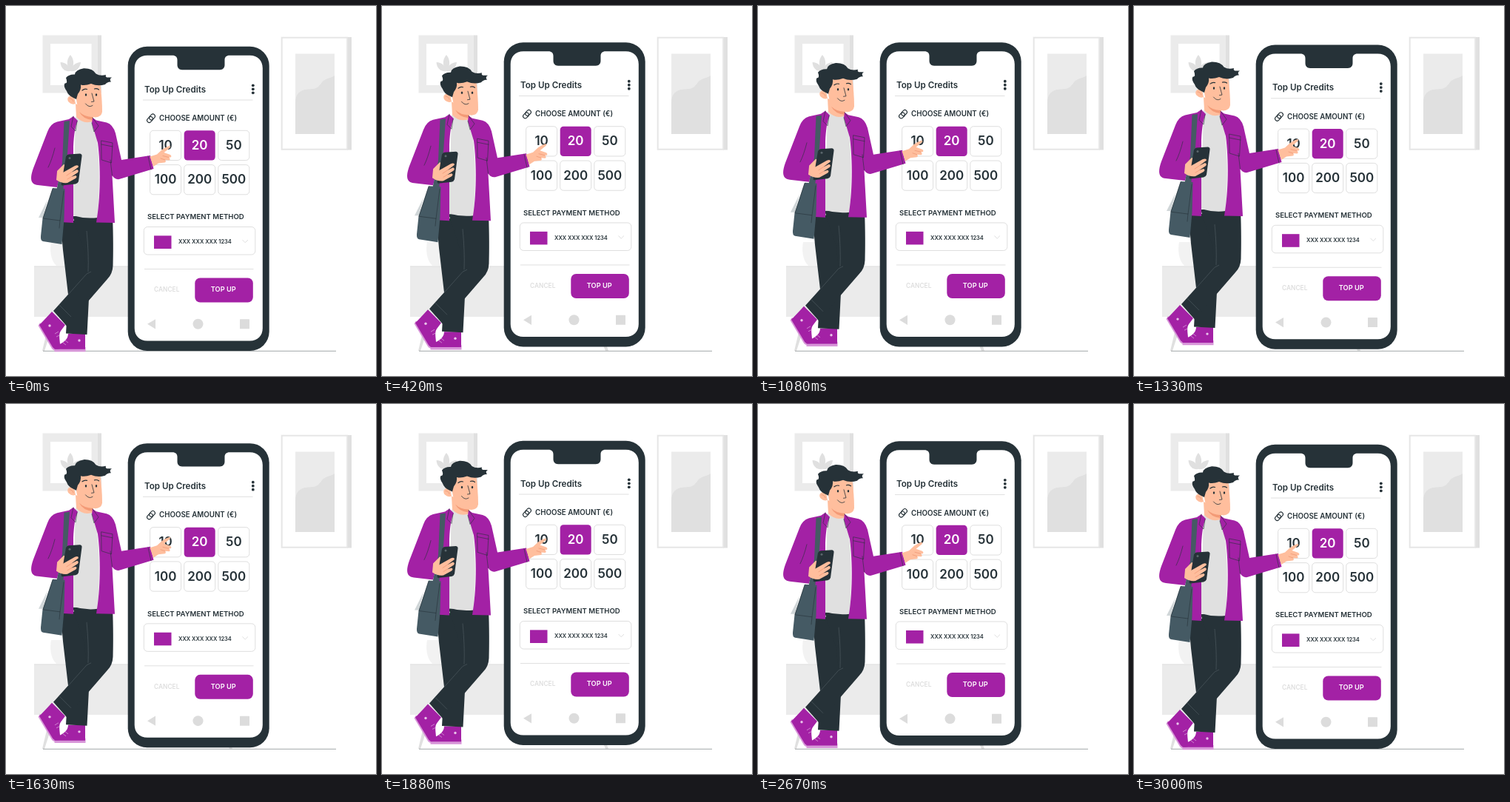
Recreate the animation shown at these times as an HTML page. Size 500 by 500 pixels, loop 3040 ms.

```html
<!DOCTYPE html>
<html lang="en">
<head>
<meta charset="utf-8">
<title>Top up credits</title>
<style>
  html, body { margin: 0; width: 100%; height: 100%; overflow: hidden; background: #fff; }
  svg { display: block; width: 100vw; height: 100vh; }
  text { font-family: Inter, Roboto, sans-serif; font-weight: 600; fill: #263238; }
  .dark { fill: #263238; }
  .purple { fill: #a321a5; }
  .skin { fill: #ffbe9d; }
  .bag { fill: #455a64; }
  .g1 { fill: #ebebeb; }
  .g2 { fill: #e0e0e0; }
  .line { fill: none; stroke: #263238; stroke-width: .6; stroke-linecap: round; stroke-linejoin: round; }
  .crease { stroke: #e98c68; }
  .rule { fill: none; stroke: #e0e0e0; stroke-width: 1; }
  .box { fill: #fff; stroke: #dedede; stroke-width: 1; }
  .num { font-size: 17px; text-anchor: middle; }
</style>
</head>
<body>
<svg viewBox="0 0 500 500">
  <!-- room -->
  <g>
    <rect class="g1" x="49.5" y="39.5" width="75" height="78"/>
    <rect class="g2" x="124" y="39.5" width="5" height="78"/>
    <rect x="60" y="51" width="55.5" height="56" fill="#fff"/>
    <g class="g2">
      <path d="M87 66C93 73 92 82 87 88C82 82 81 73 87 66Z"/>
      <path d="M73.5 76C81 76 86 81 87 88C79 89 74 84 73.5 76Z"/>
      <path d="M101 76C94 76 88 81 87 88C95 89 100 84 101 76Z"/>
    </g>
    <rect class="g2" x="461" y="42" width="6" height="152.5"/>
    <rect x="372.7" y="42.7" width="88.5" height="151" fill="#fff" stroke="#e6e6e6" stroke-width="2"/>
    <rect class="g1" x="391" y="64.5" width="53" height="108.5"/>
    <path class="g2" d="M391 173V131C391 119 397 113 408 112.5C420 112 421 111 427 103C432 97 439 98 444 94V173Z"/>
    <path d="M61 319H80V351H68C60 343 59 330 61 319Z" fill="#f2f2f2"/>
    <rect class="g1" x="38" y="351.5" width="275" height="68.5"/>
    <path class="rule" d="M38 352H313"/>
    <path class="g2" d="M60 420H67L52 466H49ZM283 420H290L306 466H302Z"/>
    <path d="M50 466.3H446" stroke="#8b9194" stroke-width=".8"/>
  </g>

  <!-- big phone -->
  <g id="phone">
    <rect class="dark" x="164.7" y="54.8" width="191" height="411.2" rx="26"/>
    <path fill="#fff" d="M191 66.8H225C229 66.8 231.5 69 231.5 73V79.5C231.5 83.5 234 86.2 238 86.2H289C293 86.2 295.500 83.5 295.500 79.5V73C295.500 69 298 66.8 302 66.8H329.5C340 66.8 346.8 74 346.8 84V435.500C346.8 445.500 340 452.500 329.5 452.500H191C180.500 452.500 173.700 445.500 173.700 435.500V84C173.700 74 180.500 66.8 191 66.8Z"/>
    <text x="187" y="116.600" font-size="11.600">Top Up Credits</text>
    <g class="dark">
      <circle cx="333.800" cy="107.300" r="1.900"/>
      <circle cx="333.800" cy="112.300" r="1.900"/>
      <circle cx="333.800" cy="117.300" r="1.900"/>
    </g>
    <path class="rule" d="M185 127H333.500M187 355.500H334.500"/>
    <g fill="none" stroke="#263238" stroke-width="1.100">
      <rect x="-4.300" y="-2.900" width="8.600" height="5.800" rx="2.900" transform="translate(197.500 150) rotate(-45)"/>
      <rect x="-4.300" y="-2.900" width="8.600" height="5.800" rx="2.900" transform="translate(194.500 153.500) rotate(-45)"/>
    </g>
    <text x="207" y="155" font-size="9.750">CHOOSE AMOUNT (€)</text>
    <g id="amounts"></g>
    <text x="191" y="288.200" font-size="9.600">SELECT PAYMENT METHOD</text>
    <rect class="box" x="186.300" y="298.500" width="150.500" height="37.500" rx="5"/>
    <rect class="purple" x="200" y="310.400" width="23.500" height="17.600"/>
    <text x="233" y="321.200" font-size="7.500">XXX XXX XXX 1234</text>
    <path class="rule" d="M319.500 316L323.200 319.800L327 316"/>
    <text x="217.200" y="386.300" font-size="8.400" text-anchor="middle" style="fill:#dedede">CANCEL</text>
    <rect class="purple" x="255.300" y="367.500" width="78.500" height="33" rx="7"/>
    <text x="293.700" y="386.300" font-size="9.200" text-anchor="middle" style="fill:#fff">TOP UP</text>
    <g fill="#dcdcdc">
      <path d="M191 429.800L202 423.200V436.500Z"/>
      <circle cx="259.500" cy="429.800" r="7"/>
      <rect x="316" y="423.300" width="13" height="13" rx=".5"/>
    </g>
  </g>

  <!-- man -->
  <g id="man">
    <!-- shoes -->
    <path fill="#d795d8" d="M46 428L43.500 432L62 463C64 466 70 467 73 464L71 460Z"/>
    <path class="purple" d="M62 413L80 431L74 439C70 444 74 455 73 463C70 465 65 464 63 461L45 431Q52 424 62 413Z"/>
    <path fill="#d795d8" d="M65.500 463.800V467.200H107.500V461Z"/>
    <path class="purple" d="M84 443H107V463.800H65.500C67 458 75 457 80 452Q84 448 84 443Z"/>
    <circle cx="59" cy="432" r="1.700" fill="#e9c4ea"/>
    <circle cx="99" cy="452" r="1.700" fill="#e9c4ea"/>
    <path d="M66 443L71 440M68 447L72 445M80 452L84 455M77 455L81 458" stroke="#e9c4ea" stroke-width=".6"/>

    <!-- trousers -->
    <path class="dark" d="M73 284L77 330L84 390L81 442.500L109.500 444L112 395L124 300Z"/>
    <path class="dark" d="M90 284H144C145 310 145 335 144.500 351Q144 362 137 369L82 432.500L64 412L109 362L105 330Z"/>
    <path d="M109 362L84 390M109 362L115 359M109 304Q112 335 111 359M72 404L88 420" fill="none" stroke="#5b676c" stroke-width=".5"/>

    <!-- tee and neck -->
    <path class="g2" d="M94 150L118 156C125 180 128 225 124 286Q107 288 90 283Z"/>
    <path class="skin" d="M94 132L95 150Q104 160 117 156L119 146Z"/>
    <path d="M99 143Q106 150 117 150L117 154Q104 153 99 143Z" fill="#f39a76"/>

    <!-- jacket -->
    <path class="purple" d="M91 149L85 153L69 156.500Q60 159 56 170L37 219C32 233 33 241 43 242L69 245L75 222L74 250L73 292L91 293V190Q92 165 97 155Z"/>
    <path class="purple" d="M117 151L122 154.500L136 157.500Q144.500 160 148 172L156 208L195 202L199.500 220L153 234Q147 235 143.500 229L147 293L122 292.500C128 260 128 215 124 185L116 158Z"/>
    <path class="line" d="M91 149L88 163L94 169L96 156M117 151L125 162L119 170L116 158M129 182L144 185L142.500 212L129.500 208ZM129 187L144 190M143.500 229L141 208M66 192Q62 208 57 218M192 203L196 221"/>

    <!-- bag -->
    <path class="bag" d="M78.500 156L86 155L83 200L77 250H68L76 212Z"/>
    <path class="bag" d="M56 262L44 286H50Z" opacity=".25"/>
    <path class="bag" d="M63 246L79.500 247L78.500 288L75.500 322L50 318Q46.500 317 47 311L49.500 287Z"/>
    <path class="line" d="M63 247L50 287L73 290L78 250M73 290L72 300"/>

    <!-- small phone and hand -->
    <path class="skin" d="M69 223L78 214L84 216L80 239L71 237Z"/>
    <path class="dark" d="M84.500 200.500L100 199.500Q103 200 102.500 203L98 237Q97 240 94 240.500L76 242.500Q74 242 75 239L81 203.500Q82 201 84.500 200.500Z"/>
    <circle cx="86" cy="205.500" r="1.500" fill="#5b676c"/>
    <path class="skin" d="M69 224L75 218Q78 222 77 225L93 216Q98 214 98 217.500L88 225L96 221Q99 222 97 225L88 231L94 229Q97 230 94 233L83 239Q75 240 68 235Z"/>
    <path class="line crease" d="M88 225L82 229M88 231L83 234"/>

    <!-- pointing hand -->
    <path class="skin" d="M194.500 203.500L204 200.500L211 194Q217 190 221 189Q223.500 190 221 192L213.500 198L222 201Q224.500 203 222.500 204.500L220 204.500Q223 207 220.500 208.500L215 208Q217 210.500 214.500 211.500L206 212.500L199 217Z"/>
    <path class="line crease" d="M220 204.500L212 202.500M215 208L209 206"/>

    <!-- head -->
    <path class="skin" d="M92 108L127 102Q130 125 130 143Q129 150 121 150.500Q106 149 97 138Z"/>
    <path class="skin" d="M92 122C84 119 81 126 85 130Q89 134 94 132Z"/>
    <path class="line crease" d="M86 125Q90 125 91 129"/>
    <path class="dark" d="M91 124Q84 121 82 115Q77 108 79.500 104.500Q84 105 81 97Q85 92 93 92.500Q94 86 105 84.300Q117 84 121.500 91.500Q127 95 135 93Q134 95.500 136.500 96.500L143 96.500Q139 99 142 102.500Q137 102 134 106Q124 109 115 105Q107 108 101 106.500Q102 113 97 119L95 126Z"/>
    <path class="line" style="stroke-width:1.200" d="M103 114Q106 111.500 109.500 112.500M119.500 112Q122.500 111 125.500 113"/>
    <ellipse class="dark" cx="108" cy="120" rx="1.200" ry="1.800"/>
    <ellipse class="dark" cx="122" cy="120" rx="1.200" ry="1.800"/>
    <path class="line" style="stroke-width:.8" d="M116 118L119 129L115.500 129.500M107.500 132Q112 138 117 134.500"/>
  </g>
</svg>
<script>
const $ = id => document.getElementById(id);

const tile = (label, i) => {
  const x = 194.6 + (i % 3) * 46.1, y = i < 3 ? 168.3 : 214.6, on = label === 20;
  return `<rect x="${x}" y="${y}" width="42" height="40.2" rx="4.5" class="${on ? 'purple' : 'box'}"/>
    <text class="num" x="${x + 21}" y="${y + 25.6}"${on ? ' style="fill:#fff"' : ''}>${label}</text>`;
};
$('amounts').innerHTML = [10, 20, 50, 100, 200, 500].map(tile).join('');

const LOOP = 3040, STEP = 1000 / 24, LAST = 72, RISE = 10;

// Linear rise and fall within one period
const lift = (t, period) => -RISE * (1 - Math.abs(1 - 2 * (t % period) / period));

const move = (id, y) => $(id).setAttribute('transform', `translate(0 ${y.toFixed(3)})`);

const start = performance.now();
function draw(now) {
  const t = Math.max(0, now - start) % LOOP;
  const held = Math.min(LAST, Math.floor((t + 5) / STEP)) * STEP;
  move('phone', lift(held, 1500));
  move('man', lift(held, 3000));
  requestAnimationFrame(draw);
}
draw(start);
</script>
</body>
</html>
```
